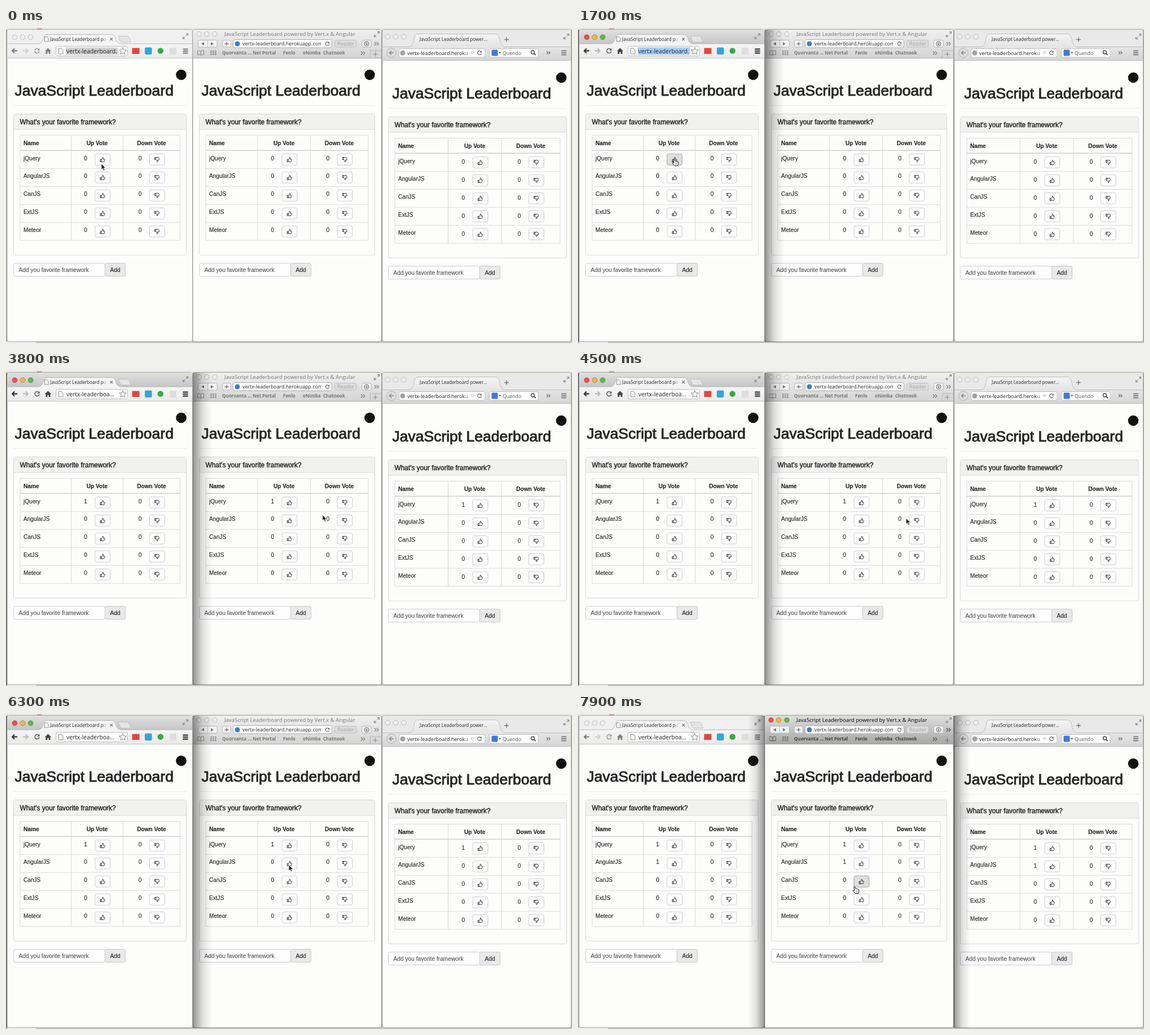
An HTML page for the animation above (8000 ms loop, 1003 by 559 pixels).

```html
<!DOCTYPE html>
<html lang="en">
<head>
<meta charset="utf-8">
<title>JavaScript Leaderboard</title>
<style>
html, body { margin: 0; width: 100%; height: 100%; overflow: hidden; background: #e6e6e2; }
#stage { display: block; width: 100vw; height: 100vh; font-family: "Liberation Sans", Arial, sans-serif; fill: #262626; }
.ui { font-family: "Open Sans", "Noto Sans", sans-serif; }
.mid { text-anchor: middle; }
.bold { font-weight: 700; }
.page text { stroke: #262626; stroke-width: .15px; }
.page .medium { stroke-width: .45px; }
.page .title { stroke-width: .9px; }
.page .hint { fill: #555; stroke: #555; }
#cursor { animation: travel 8s ease-in-out infinite; }
@keyframes travel {
  0%, 3% { transform: translate(169px, 241px); }
  11%, 14% { transform: translate(172px, 232px); }
  18%, 35% { transform: translate(169px, 232px); }
  44%, 50% { transform: translate(561px, 255.500px); }
  62%, 71% { transform: translate(599px, 266.500px); }
  79%, 93.75% { transform: translate(501px, 268px); }
  98.75%, 100% { transform: translate(489px, 306px); }
}
</style>
</head>
<body>
<svg id="stage" viewBox="0 0 1003 559" preserveAspectRatio="none"></svg>
<script>
const LOOP = 8000, LEFT_FRONT = 1300, MIDDLE_FRONT = 6500, LEAVE = 2850;
const FIRST_VOTE = 2200, SECOND_VOTE = 7400;
let rules = '', ruleCount = 0;

// Starts hidden and toggles at each given time (ms).
function flip(...times) {
  const name = 'flip' + ruleCount++;
  const stops = times.map((t, i) => `${t / LOOP * 100}%{opacity:${1 - i % 2}}`).join('');
  rules += `@keyframes ${name}{0%{opacity:0}${stops}}`;
  return `style="animation:${name} 8s step-end infinite"`;
}
const rect = (x, y, w, h, fill, attrs = '') =>
  `<rect x="${x}" y="${y}" width="${w}" height="${h}" fill="${fill}" ${attrs}/>`;
const box = (x, y, w, h, fill, edge, r = 3) => rect(x, y, w, h, fill, `rx="${r}" stroke="${edge}"`);
const disc = (x, y, r, fill, attrs = '') => `<circle cx="${x}" cy="${y}" r="${r}" fill="${fill}" ${attrs}/>`;
const shape = (d, fill, attrs = '') => `<path d="${d}" fill="${fill}" ${attrs}/>`;
const line = (d, color = '#555', w = 1) => shape(d, 'none', `stroke="${color}" stroke-width="${w}"`);
const text = (x, y, s, size, attrs = '') => `<text x="${x}" y="${y}" font-size="${size}" ${attrs}>${s}</text>`;
const at = (x, y, s, extra = '') => `<g transform="translate(${x} ${y}) ${extra}">${s}</g>`;
const group = (s, attrs) => `<g ${attrs}>${s}</g>`;

const thumb = line('M-4 0h2v4h-2zM-2 0C-.6-.8 0-2.3.2-4C2-4.3 2-2.2 1.2-.7H3.6Q4.6-.3 3.8.9Q4.2 1.7 3.4 2.3Q3.6 3.9 2 4H.3L-2 3.5', '#222', .95);
const reload = line('M3.3-2.4A4 4 0 1 0 4 1', '#666', 1.4) + shape('M4.5-4.6V-.6H.5z', '#666');
const menu = color => line('M-4.5-3.5h9m-9 3.5h9m-9 3.5h9', color, 1.8);
const expand = line('M1-1L4.2-4.2M-1 1L-4.2 4.2M1-4.5h3.5V-1M-4.5 1v3.5H-1', '#888', 1.2);
const more = line('M-4-3l3 3-3 3m4-6l3 3-3 3', '#666', 1.3);

function cell(mid, y, countY, isUp, voteTime, hoverTimes) {
  const x = mid - 20.5, mark = 'class="mid"';
  const button = (fill, edge, attrs = '') => rect(mid - 3.7, y, 26.8, 19.8, fill, `rx="3" stroke="${edge}" ${attrs}`);
  const count = voteTime
    ? text(x, countY, 0, 10.2, mark + flip(0, voteTime)) + text(x, countY, 1, 10.2, mark + flip(voteTime))
    : text(x, countY, 0, 10.2, mark);
  return count + button('#fefefe', '#ccccd4')
    + (hoverTimes ? button('#dedede', '#aaa', flip(...hoverTimes)) : '')
    + at(mid + 9.5, y + 10, thumb, isUp ? '' : 'scale(1 -1)');
}

function page({ left, right, dy, cols, titleX, logo, countDy = 0, hover = {} }) {
  const width = right - left, [c0, c1, c2, c3] = cols, rowTop = i => 217.5 + 31.9 * i;
  const midUp = (c1 + c2) / 2, midDown = (c2 + c3) / 2, votes = [FIRST_VOTE, SECOND_VOTE];
  let s = disc(logo, 83, 9.3, '#111')
    + text(titleX, 119.5, 'JavaScript Leaderboard', 26.5, 'class="title"')
    + line(`M${left} 137.5H${right}`, '#ebebee')
    + box(left, 152.5, width, 250.5, '#fdfdfc', '#d8d8de')
    + shape(`M${left + .5} 180V155q0-2 2-2H${right - 2.5}q2 0 2 2V180z`, '#f1f1f0')
    + line(`M${left} 180H${right}`, '#d8d8de')
    + text(left + 11, 170.5, "What's your favorite framework?", 11.9, 'class="medium"')
    + line(`M${c0} 190.5H${c3}V377H${c0}zM${c1} 190.5V377M${c2} 190.5V377`, '#d9d9dd')
    + line(`M${c0} 217.3H${c3}`, '#d0d0d4', 1.6)
    + text(c0 + 6, 207.7, 'Name', 10.2, 'class="bold"')
    + text(midUp, 207.7, 'Up Vote', 10.1, 'class="bold mid"')
    + text(midDown, 207.7, 'Down Vote', 10.1, 'class="bold mid"');
  ['jQuery', 'AngularJS', 'CanJS', 'ExtJS', 'Meteor'].forEach((name, i) => {
    const y = rowTop(i), countY = y + 17 + countDy;
    s += (i ? line(`M${c0} ${y}H${c3}`, '#d9d9dd') : '') + text(c0 + 6, y + 17, name, 10.1)
      + cell(midUp, y + 6, countY, true, votes[i], hover[i])
      + cell(midDown, y + 6, countY, false);
  });
  s += box(left, 417.5, 162, 23, '#fefefe', '#ccccd6')
    + box(left + 162, 417.5, 36, 23, '#e9e9e9', '#c8c8cc', 2)
    + text(left + 9, 432.7, 'Add you favorite framework', 10.2, 'class="hint"')
    + text(left + 180, 432.7, 'Add', 10.2, 'class="mid"');
  return group(s, `class="page" transform="translate(0 ${dy})"`);
}

function lights(xs, y, r, times) {
  const draw = colors => xs.map((x, i) => disc(x, y, r, colors[i], 'stroke="#0004" stroke-width=".8"')).join('');
  return draw(['#efefef', '#efefef', '#efefef']) + (times ? group(draw(['#ee5048', '#f4b83a', '#5dbb46']), flip(...times)) : '');
}
const dimmed = (s, opacity, times) => group(s, `opacity="${opacity}"`) + group(s, flip(...times));

function leftWindow() {
  const front = [LEFT_FRONT, MIDDLE_FRONT];
  const bar = 'M2.5 28V7q0-4 4-4H326q4 0 4 4V28z';
  const icons = line('M20 40.5H11M15 36.5l-4 4 4 4', '#333', 1.8)
    + line('M30 40.5h9M35 36.5l4 4-4 4', '#bbb', 1.8) + at(55, 40.5, reload)
    + shape('M69 41l5.5-5.5L80 41h-1.6v5h-2.6v-3.4h-2.6V46h-2.6v-5z', '#444') + at(318, 41, menu('#333'));
  return rect(2, 2.5, 328.5, 554, '#fdfdfc', 'rx="4" stroke="#9a9a9a" stroke-width=".8"')
    + shape(bar, '#f0f0f0') + shape(bar, 'url(#leftBar)', flip(...front))
    + rect(2.5, 28, 327.5, 25.5, 'url(#toolbar)') + line('M2.5 53.5H330', '#c4c4c4')
    + shape('M58 28Q64 27 67 17Q68 11.5 72 11.5H188Q192 11.5 194 17Q196 27 203 28.5H58z', '#f4f4f4')
    + line('M2.5 28H58Q64 27 67 17Q68 11.5 72 11.5H188Q192 11.5 194 17Q196 27 203 28H330', '#b4b4b4', .9)
    + shape('M199 14.5h16q2 0 3 2l3.5 8.5h-16q-2 0-3-2z', '#e5e5e5', 'stroke="#b8b8b8" stroke-width=".8"')
    + lights([15.5, 29.7, 43.7], 16.2, 4.4, front)
    + line('M68.5 15.5h4l2.5 2.5v6h-6.5z', '#888', .9)
    + text(78, 23, 'JavaScript Leaderboard p<tspan fill="#aaa">o</tspan>', 8.15)
    + line('M184.5 17.5l4.5 4.5m0-4.5l-4.5 4.5', '#777', 1.2) + at(318, 14.5, expand)
    + dimmed(icons, .65, front)
    + box(88.5, 32.5, 127, 17, '#fff', '#bcbcbc')
    + line('M93.5 36h4.5l3 3v7h-7.5z', '#888')
    + group(rect(106, 34.5, 92, 13, '#cfcfcf') + rect(106, 34.5, 92, 13, '#a9cdf8', flip(LEFT_FRONT))
      + text(107, 44.6, 'vertx-leaderboard.', 10.4), flip(0, FIRST_VOTE))
    + text(107, 44.6, 'vertx-leaderboa…', 10.4, flip(FIRST_VOTE))
    + shape('M207 34.5l1.8 4.2 4.7.4-3.6 3 1.1 4.6-4-2.5-4 2.5 1.1-4.6-3.6-3 4.7-.4z', '#fff', 'stroke="#777" stroke-width=".9"')
    + rect(223.5, 35.5, 13, 10.5, '#d84a42') + rect(246, 34.5, 12.5, 12.5, '#35a4dc', 'rx="2"')
    + disc(273.7, 40.5, 5.2, '#3ba847') + rect(290, 35, 12, 12, '#dedede');
}

function middleWindow() {
  const front = [MIDDLE_FRONT], bar = 'M331.5 53V7q0-4 4-4H661q4 0 4 4V53z';
  const title = 'JavaScript Leaderboard powered by Vert.x &amp; Angular';
  const address = `<svg x="419" y="20" width="139.5" height="16">${text(0, 11.3, 'vertx-leaderboard.herokuapp.com', 8.9)}</svg>`;
  const bookmark = (x, s) => text(x, 47.3, s, 8, 'class="bold" fill="#555"');
  const grid = [0, 1, 2].map(r => [0, 1, 2].map(c => rect(362 + c * 4, 40 + r * 3, 2.8, 2, '#777')).join('')).join('');
  const icons = line('M339.5 40.5q3-1 5.5.7q2.5-1.7 5.5-.7v7q-3-1-5.5.7q-2.5-1.7-5.5-.7zM345 41v7', '#666') + grid
    + bookmark(383, 'Quorvanta … Net Portal') + bookmark(491, 'Fenlo') + bookmark(526, 'oNimba') + bookmark(562, 'Chatnook')
    + at(633, 44.5, more) + at(657, 28, more) + line('M650.5 46.5h8m-4-4v8', '#777', 1.2);
  return rect(331, 2.5, 334.3, 554, '#fdfdfc', 'rx="4" stroke="#8e8e8e" stroke-width=".8"')
    + shape(bar, 'url(#paleBar)') + shape(bar, 'url(#darkBar)', flip(...front))
    + line('M331.5 53.5H665', '#a8a8a8') + line('M645.5 53V40h19.5', '#aaa', .8)
    + lights([342, 355.7, 370], 10.7, 4.2, front)
    + text(387, 14, title, 9.54, 'fill="#777"') + text(387, 14, title, 9.54, flip(...front))
    + at(657, 11, expand)
    + box(340.5, 21.5, 34, 12.5, '#f2f2f2', '#b4b4b4') + line('M357.5 22v12', '#bbb')
    + shape('M351 25v6l-5-3zM363 25v6l5-3z', '#777')
    + box(383.5, 21.5, 15, 12.5, '#f2f2f2', '#b4b4b4') + line('M387.5 28h7m-3.5-3.5v7', '#777', 1.3)
    + box(402.5, 20.5, 175, 14.5, '#fff', '#aaa') + disc(410, 28, 4.5, '#3f7fc0') + address
    + at(569.5, 28, reload, 'scale(.8)')
    + box(582.5, 21.5, 38.5, 12.5, '#dcdcdc', '#c0c0c0') + text(602, 31.3, 'Reader', 9, 'class="mid" fill="#a5a5a5"')
    + box(630.5, 21.5, 17, 12.5, '#f0f0f0', '#b4b4b4') + disc(639, 28, 4, 'none', 'stroke="#666"')
    + line('M639 25.5v4m-2-2l2 2.5 2-2.5', '#666')
    + dimmed(icons, .75, front);
}

function rightWindow() {
  const tab = 'M667 33.5H714Q721 33 723 20Q724 10.5 730 10.5H867Q873 10.5 875 20Q877 33 884 33.5H1001';
  return rect(667, 2.5, 334.5, 554, '#fdfdfc', 'rx="4" stroke="#9a9a9a" stroke-width=".8"')
    + shape('M667.5 57V7q0-4 4-4H997q4 0 4 4V57z', '#e9e9e9')
    + shape(tab + 'V57H667z', 'url(#tabBar)') + line(tab, '#b8b8b8', .9) + line('M667 57.5H1001', '#b8b8b8')
    + lights([676.5, 690.7, 705], 15.5, 4.4)
    + text(733, 23, 'JavaScript Leaderboard power…', 8.1)
    + line('M883 20.5h8m-4-4v8', '#777', 1.4) + at(993, 15, expand)
    + box(696.5, 36.5, 152.5, 15.5, '#fff', '#bdbdbd') + disc(683, 44, 8.3, '#dedede', 'stroke="#b0b0b0"')
    + line('M687 44h-7.5M683 40.5l-3.5 3.5 3.5 3.5', '#888', 1.7)
    + disc(703, 44.3, 4.5, '#a2a2a2') + text(711, 47.5, 'vertx-leaderboard.herok<tspan fill="#777">u</tspan>', 9)
    + line('M823.5 42.5h6l-3 4z', '#bbb', .9) + at(839, 44, reload, 'scale(.85)')
    + box(856.5, 36.5, 86.5, 15.5, '#fff', '#bdbdbd') + rect(860.5, 38.5, 11, 11, '#4477d4', 'rx="1.5"')
    + shape('M873 42.5h4.5l-2.2 3z', '#555') + text(880, 47.5, 'Quendo', 8.8, 'fill="#555"')
    + disc(933.5, 43, 3, 'none', 'stroke="#444" stroke-width="1.4"') + line('M935.7 45.2l3 3', '#444', 1.8)
    + at(961.5, 44, more, 'scale(.9)') + at(988.5, 44, menu('#808080'));
}

const gradient = (id, vertical, ...stops) => `<linearGradient id="${id}" x2="${vertical ? 0 : 1}" y2="${vertical ? 1 : 0}">`
  + stops.map(([color, opacity = 1], i) => `<stop offset="${i / (stops.length - 1)}" stop-color="${color}" stop-opacity="${opacity}"/>`).join('') + '</linearGradient>';
const defs = gradient('leftBar', true, ['#e0e0e0'], ['#c6c6c6']) + gradient('toolbar', true, ['#f5f5f5'], ['#eaeaea'])
  + gradient('paleBar', true, ['#f0f0f0'], ['#d4d4d4']) + gradient('darkBar', true, ['#dedede'], ['#a8a8a8'])
  + gradient('tabBar', true, ['#f4f4f4'], ['#d6d6d6'])
  + gradient('fadeRight', false, ['#000', .42], ['#000', .12], ['#000', 0])
  + gradient('fadeLeft', false, ['#000', 0], ['#000', .12], ['#000', .42]);

const hand = shape('M-.3 1Q1-.8 2 1L3 4.3Q4.2 3.5 5 4.5Q6.3 4 7 5Q8.8 4.8 8.8 6.5V9.5L7.7 12.5H2.5L-1.5 8Q-2 6.5-.2 6.8L1 7.5z', '#fff', 'stroke="#111"')
  + line('M4 7.5v3m2-3v3', '#333', .7);
const arrow = shape('M0 0V10.2L2.4 8 4.1 11.9 5.9 11 4.2 7.4H7.4z', '#111', 'stroke="#fff" stroke-width=".7"');

const desktop = rect(0, 0, 1003, 559, '#e6e6e2') + rect(0, 3, 2, 556, '#aaa') + rect(1001, 3, 2, 556, '#aaa')
  + rect(0, 556.5, 1003, 2.5, '#c2c2c0') + rect(0, 557, 53, 2, '#eee')
  + rect(55, 1, 9, 1, '#c66') + rect(330.5, 54, 1, 503, '#888') + rect(665, 4, 2, 553, '#aaa');
const shadows = group(rect(331, 3, 34, 554, 'url(#fadeRight)') + rect(0, 3, 2, 556, '#0005'), flip(LEFT_FRONT, MIDDLE_FRONT))
  + group(rect(301, 3, 30, 554, 'url(#fadeLeft)') + rect(665.5, 3, 30, 554, 'url(#fadeRight)'), flip(MIDDLE_FRONT));

const scene = desktop + group(leftWindow() + middleWindow() + rightWindow(), 'class="ui"')
  + page({ left: 13.5, right: 319.5, dy: 0, cols: [25, 115.5, 207.5, 308.5], titleX: 15.5, logo: 310.5, hover: { 0: [LEFT_FRONT, LEAVE] } })
  + page({ left: 342.5, right: 653.5, dy: 0, cols: [354, 446, 539.5, 642], titleX: 346.5, logo: 644.5, hover: { 1: [MIDDLE_FRONT, 7600], 2: [7700] } })
  + page({ left: 677.5, right: 993.5, dy: 5, cols: [689, 783.5, 878, 982], titleX: 684.5, logo: 984, countDy: 1.5 })
  + shadows
  + group(group(arrow, flip(0, LEFT_FRONT, LEAVE, MIDDLE_FRONT)) + group(hand, flip(LEFT_FRONT, LEAVE, MIDDLE_FRONT)), 'id="cursor"');
document.getElementById('stage').innerHTML = `<style>${rules}</style><defs>${defs}</defs>${scene}`;
</script>
</body>
</html>
```
